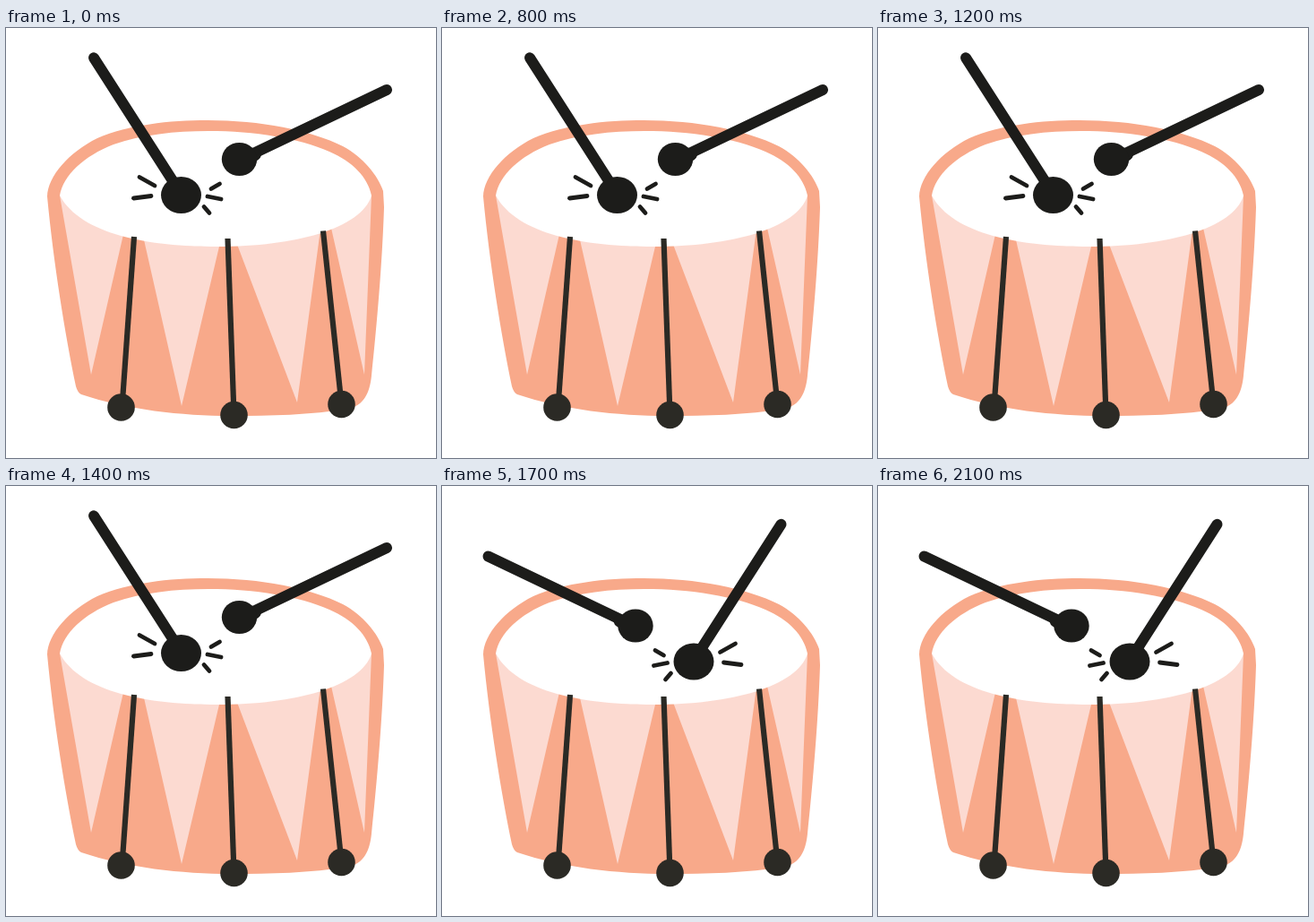
Animation of 480 by 480 pixels, one loop 2200 ms. Source, as an HTML page with a canvas:

```html
<!DOCTYPE html>
<html lang="en">
<head>
<meta charset="utf-8">
<title>Drum</title>
<style>
  html, body { margin: 0; width: 100%; height: 100%; overflow: hidden; background: #fff; }
  canvas { display: block; width: 480px; height: 480px; }
</style>
</head>
<body>
<canvas id="stage" width="480" height="480"></canvas>
<script>
const ctx = document.getElementById('stage').getContext('2d');
const SALMON = '#f8a98a', BLUSH = '#fcdad1', INK = '#1c1c1a', CORD = '#2b2a25';

const shell = new Path2D(`M46 188 C47 165 70 139 102 123 C137 108 182 103 225 103
  C284 103 340 114 376 132 C398 144 415 164 421 182 L422 200
  C420 262 414 332 408 388 C406 408 399 421 383 425
  C340 432 294 433 252 433 C195 433 135 426 84 409 Q80 407 78 400
  C66 342 53 262 46 188Z`);
const skin = new Path2D(`M60 187 C64 164 87 143 120 130 C151 119 189 115 226 115
  C278 115 327 123 361 138 C387 149 404 167 408 187
  C397 224 322 244 236 244 C160 244 84 231 60 187Z`);
const panels = new Path2D(`M60 187 L95 387 L138 200Z M148 210 L196 422 L246 210Z
  M246 210 L325 418 L353 210Z M360 210 L400 387 L408 187Z`);

function line(x1, y1, x2, y2, width, cap = 'round') {
  ctx.lineWidth = width;
  ctx.lineCap = cap;
  ctx.beginPath();
  ctx.moveTo(x1, y1);
  ctx.lineTo(x2, y2);
  ctx.stroke();
}

function ball(x, y, rx, ry = rx) {
  ctx.beginPath();
  ctx.ellipse(x, y, rx, ry, 0, 0, Math.PI * 2);
  ctx.fill();
}

function drawDrum() {
  ctx.fillStyle = SALMON;
  ctx.fill(shell);
  ctx.fillStyle = BLUSH;
  ctx.fill(panels);
  ctx.fillStyle = '#fff';
  ctx.fill(skin);

  ctx.fillStyle = ctx.strokeStyle = CORD;
  for (const [x1, y1, x2, y2] of [[143, 233, 129.5, 423.5], [247.5, 235, 254.5, 432], [354, 226.5, 374.5, 420]]) {
    line(x1, y1, x2, y2, 6.2, 'butt');
    ball(x2 - (x1 < 200 ? 1 : 0), y2, 15.3);
  }
}

function drawSticks() {
  ctx.fillStyle = ctx.strokeStyle = INK;
  line(98, 33.3, 187, 172, 12);
  ball(195.5, 186.5, 22.5, 20.5);
  line(425, 69, 270, 143, 12);
  line(278, 141, 270, 146, 14);
  ball(260.5, 146.5, 19.7, 18.6);

  line(149, 166.5, 166, 176, 4.8);
  line(142.5, 190, 162, 187.5, 4.8);
  line(229, 179.5, 238.5, 174, 4.8);
  line(225, 188, 240, 191, 4.8);
  line(221, 199.5, 227, 206.5, 4.8);
}

// Slow beats of 200 ms, then a fast roll of 100 ms beats.
function isMirrored(time) {
  const t = time % 2200;
  const beat = Math.floor(t < 1200 ? t / 200 : (t - 1200) / 100);
  return beat % 2 === 1;
}

function render(time) {
  ctx.fillStyle = '#fff';
  ctx.fillRect(0, 0, 480, 480);
  drawDrum();
  ctx.save();
  if (isMirrored(time)) ctx.transform(-1, 0, 0, 1, 476.5, 9.5);
  drawSticks();
  ctx.restore();
}

let start;
function tick(now) {
  start ??= now;
  render(now - start);
  requestAnimationFrame(tick);
}
render(0);
requestAnimationFrame(tick);
</script>
</body>
</html>
```
